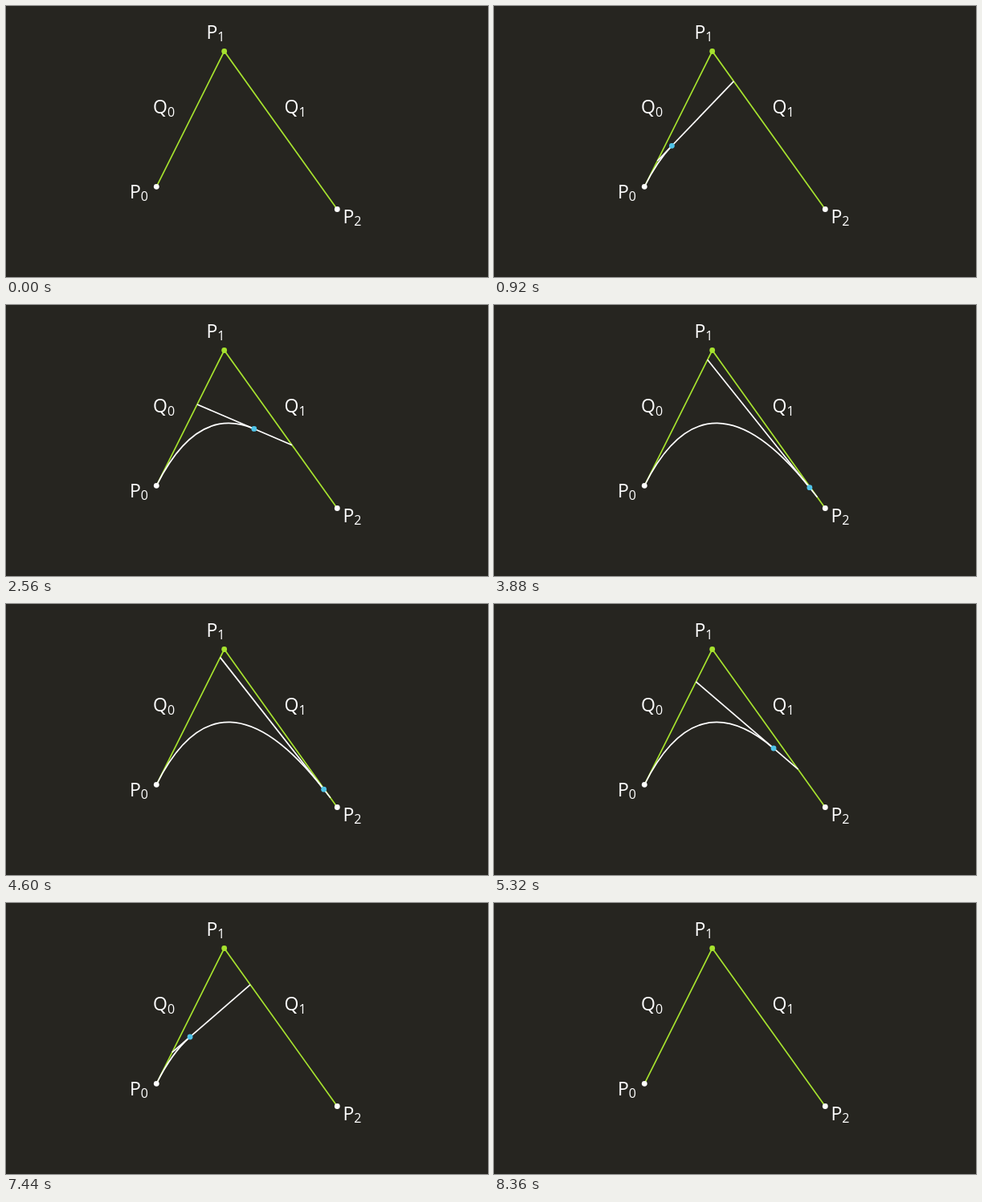
Recreate the animation shown at these times as an HTML page. Size 600 by 338 pixels, loop 8400 ms.

```html
<!DOCTYPE html>
<html>
<head>
<meta charset="utf-8">
<style>
  html, body { margin: 0; width: 100%; height: 100%; overflow: hidden; background: #262520; }
  svg { display: block; width: 600px; height: 338px; }
  path { fill: none; stroke-width: 1.7; }
  text { font: 23px "Open Sans", "Noto Sans", sans-serif; fill: #fff; }
  tspan { font-size: 16px; }
</style>
</head>
<body>
<svg viewBox="0 0 600 338">
  <path d="M187.3 225.3L271.7 56.5L412.3 253.5" stroke="#a6e22e"/>
  <g id="moving">
    <path id="curve" stroke="#fff"/>
    <path id="tangent" stroke="#fff"/>
  </g>
  <circle cx="187.3" cy="225.3" r="3.4" fill="#fff"/>
  <circle cx="271.7" cy="56.5" r="3.4" fill="#a6e22e"/>
  <circle cx="412.3" cy="253.5" r="3.4" fill="#fff"/>
  <circle id="tracer" r="3.4" fill="#4fc3e8"/>
  <text x="154" y="240">P<tspan dy="3.3">0</tspan></text>
  <text x="249.5" y="41">P<tspan dy="3.3">1</tspan></text>
  <text x="419.5" y="271">P<tspan dy="3.3">2</tspan></text>
  <text x="183" y="134.3">Q<tspan dy="3.3">0</tspan></text>
  <text x="346.5" y="134.3">Q<tspan dy="3.3">1</tspan></text>
</svg>
<script>
  const P0 = [187.3, 225.3], P1 = [271.7, 56.5], P2 = [412.3, 253.5];
  const LOOP = 8400, STEP = 40, TRAVEL = 4000, RISE = 160, FALL = 4360;
  const [moving, curve, tangent, tracer] =
    ["moving", "curve", "tangent", "tracer"].map(id => document.getElementById(id));
  const clamp = v => Math.min(1, Math.max(0, v));
  const lerp = (a, b, t) => a.map((v, i) => v + (b[i] - v) * t);
  const start = performance.now();

  // Up at constant speed, a short hold, then back down
  function progress(ms) {
    return ms < FALL ? clamp((ms - RISE) / TRAVEL) : clamp(1 - (ms - FALL) / TRAVEL);
  }

  function draw() {
    const elapsed = Math.max(0, performance.now() - start) % LOOP;
    const t = progress(Math.floor(elapsed / STEP) * STEP);
    const q0 = lerp(P0, P1, t), q1 = lerp(P1, P2, t), b = lerp(q0, q1, t);
    // De Casteljau: P0, q0, b bound the part of the curve covered so far
    curve.setAttribute("d", `M${P0}Q${q0} ${b}`);
    tangent.setAttribute("d", `M${q0}L${q1}`);
    tracer.setAttribute("cx", b[0]);
    tracer.setAttribute("cy", b[1]);
    moving.style.display = tracer.style.display = t > 0 ? "" : "none";
    requestAnimationFrame(draw);
  }
  draw();
</script>
</body>
</html>
```
